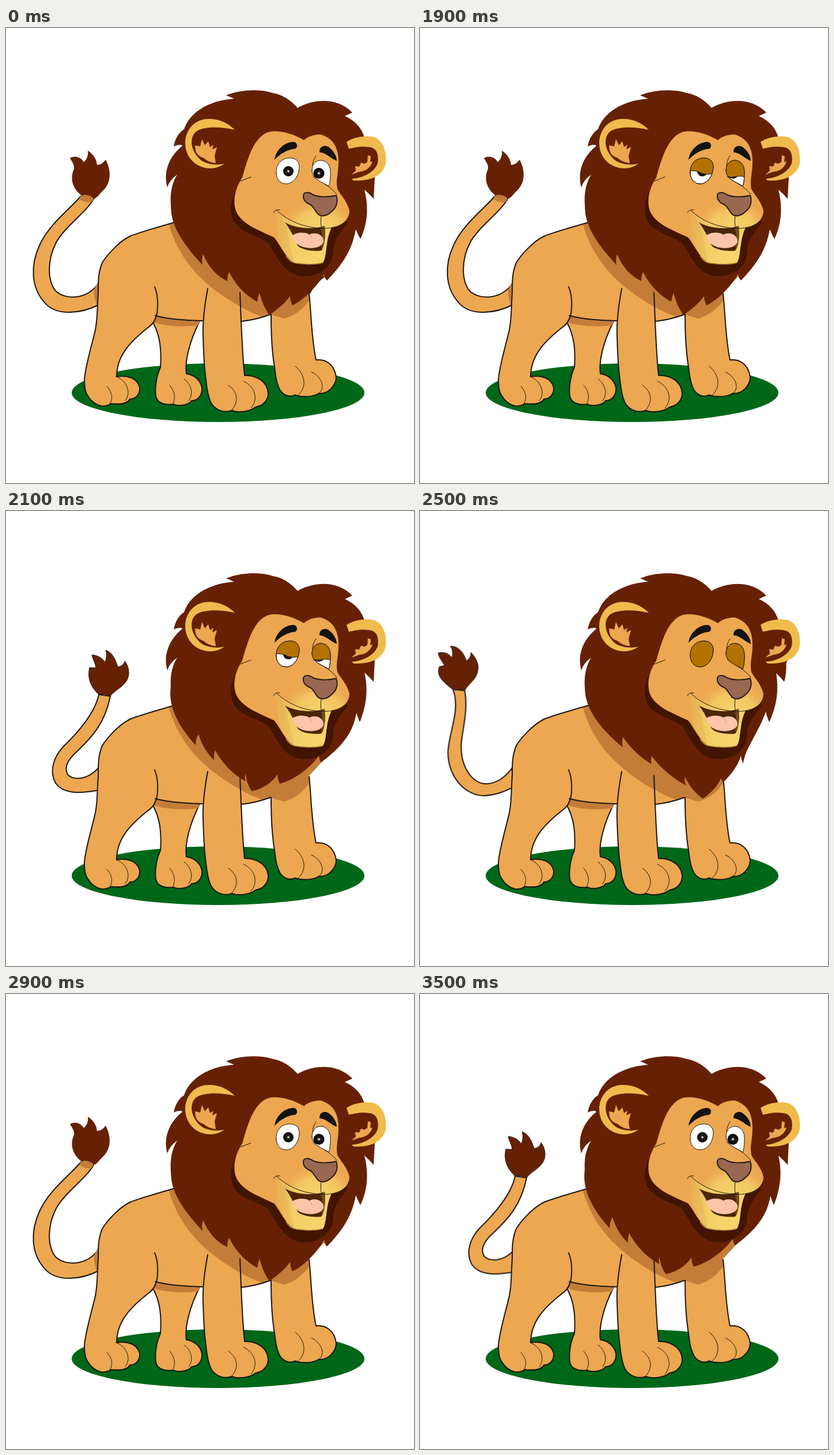
These frames come from a looping animation (708x791 px, 3.7 s). An HTML page:

```html
<!DOCTYPE html>
<html lang="en">
<head>
<meta charset="utf-8">
<title>Lion</title>
<style>
html, body { margin: 0; width: 100%; height: 100%; overflow: hidden; background: #fff; }
svg { display: block; width: 100%; height: 100%; }
.mane { fill: #662104; }
.dark { fill: #431400; }
.fur { fill: #eca750; }
.shade { fill: #c47d38; }
.gold { fill: #efbb4d; }
.ink { stroke: #1c1512; stroke-width: 2; stroke-linejoin: round; stroke-linecap: round; }
.thin { stroke: #1c1512; stroke-width: 1; stroke-linecap: round; }
.line { fill: none; }

.mid, .left, .right, .half, .shut, .neck, .tailL, .tailR { animation: 3700ms step-end infinite; }
.mid { animation-name: mid; }
.left { animation-name: left; }
.right { animation-name: right; }
.half { animation-name: half; }
.shut { animation-name: shut; }
.neck { animation-name: neck; }
.tailL { animation-name: tailL; }
.tailR { animation-name: tailR; }
@keyframes mid {
  0%, 51.3513%, 62.1621%, 78.3783% { visibility: visible; }
  45.9459%, 56.7567%, 67.5675%, 89.1891%, 100% { visibility: hidden; }
}
@keyframes left {
  0%, 51.3513%, 78.3783%, 100% { visibility: hidden; }
  45.9459%, 67.5675% { visibility: visible; }
}
@keyframes right {
  0%, 62.1621% { visibility: hidden; }
  56.7567%, 89.1891%, 100% { visibility: visible; }
}
@keyframes half {
  0%, 67.5675%, 94.5945%, 100% { visibility: hidden; }
  45.9459%, 89.1891% { visibility: visible; }
}
@keyframes shut {
  0%, 78.3783%, 100% { visibility: hidden; }
  67.5675% { visibility: visible; }
}
@keyframes neck {
  0% { visibility: visible; }
  45.9459%, 100% { visibility: hidden; }
}
@keyframes tailL {
  0% { transform: none; }
  67.5675%, 100% { transform: matrix(1, 0, 0, .9886, .5, 1.7); }
}
@keyframes tailR {
  0% { transform: none; }
  89.1891%, 100% { transform: translate(4px, -2.5px); }
}
</style>
</head>
<body>
<svg viewBox="0 0 708 791" preserveAspectRatio="none">
<defs>
  <radialGradient id="muzzle" gradientUnits="userSpaceOnUse" cx="542" cy="346" r="68" gradientTransform="translate(0 86.5) scale(1 .75)">
    <stop offset="0" stop-color="#f5d36b"/>
    <stop offset=".55" stop-color="#f2c662"/>
    <stop offset="1" stop-color="#eca750" stop-opacity="0"/>
  </radialGradient>
  <linearGradient id="chin" gradientUnits="userSpaceOnUse" x1="468" y1="360" x2="545" y2="380">
    <stop offset="0" stop-color="#ecb656"/>
    <stop offset=".4" stop-color="#f3cd66"/>
    <stop offset="1" stop-color="#f6d56c"/>
  </linearGradient>
  <radialGradient id="pupil">
    <stop offset="0" stop-color="#fff"/>
    <stop offset=".14" stop-color="#aaa"/>
    <stop offset=".32" stop-color="#1a1a1a"/>
    <stop offset="1" stop-color="#080808"/>
  </radialGradient>
  <path id="eyeL" d="M469,252C468,238 477,226 493,226C504,226 509,233 509,242C508,258 499,270 487,271C476,271 469,263 469,252Z"/>
  <path id="eyeR" d="M531,248C531,237 537,230 547,230C558,231 563,240 563,251C563,262 562,269 560,275C550,268 532,264 531,248Z"/>
  <path id="trunk" d="M292,338C265,346 235,354 215,362C195,372 175,395 167,408C160,425 160,440 160,460C159,490 159,505 155,525C200,545 230,535 250,518Q256,513 259,500C285,507 315,508 342,509L408,510C430,508 445,503 459,498L530,520C527,500 526,480 526,460L553,431L450,340Z"/>
  <path id="frontLegs" d="M350,453C345,480 341,510 342,535C343,570 344,588 346,603C348,622 350,640 356,652C363,664 378,670 392,665C405,670 425,666 433,659C448,657 455,645 455,635C454,615 435,603 414,604C410,570 408,510 406,460M460,498C460,530 461,560 466,590C468,607 470,620 476,630C483,640 493,642 502,638C515,643 535,641 543,635C560,637 573,620 573,607C570,585 555,575 538,577C530,540 530,500 526,462"/>
  <clipPath id="trunkClip"><use href="#trunk"/></clipPath>
  <clipPath id="clipL"><use href="#eyeL"/></clipPath>
  <clipPath id="clipR"><use href="#eyeR"/></clipPath>
</defs>

<ellipse cx="368" cy="634" rx="254" ry="51" fill="#006718"/>

<!-- tails -->
<g class="mid">
  <path class="fur ink" d="M165,479C130,498 85,502 65,475C44,450 42,413 58,378C75,340 113,313 131,291Q141,280 152,297C140,320 102,345 87,373C72,402 71,438 86,457C105,475 148,472 165,436Z"/>
  <path class="shade" d="M161,441Q151,452 153,463Q154,474 158,482L164,479V440ZM130,291Q141,280 152,297L148,303Q136,304 127,297Z"/>
  <path class="mane" d="M131,291C116,280 110,262 118,245C119,237 114,232 111,226C121,221 130,225 135,233C141,228 143,220 142,213C152,220 157,228 158,238C164,238 169,234 173,229C182,246 184,268 168,283C161,290 158,295 153,297C146,290 138,289 131,291Z"/>
</g>
<g class="left"><g class="tailL">
  <path class="fur ink" d="M57,312C70,350 49,388 48,423C49,470 80,498 110,499C132,498 147,491 166,482V441C150,465 135,477 115,478C90,478 70,448 71,410C72,385 84,350 77,314Z"/>
  <path class="mane thin" d="M57,313C46,303 35,296 32,285C31,279 32,275 33,272L42,270C38,262 32,256 31,248C41,245 49,249 55,256C57,248 56,241 52,236C66,235 76,248 80,262C85,259 88,253 88,247C97,257 102,268 100,278C98,295 85,300 77,314C70,311 64,312 57,313Z"/>
</g></g>
<g class="right"><g class="tailR">
  <path class="fur ink" d="M161,319C155,350 125,385 100,409C80,430 76,455 86,473C97,489 120,494 168,484V436C148,468 118,470 107,458C101,447 106,434 121,420C150,393 172,368 181,322Z"/>
  <path class="mane thin" d="M161,319C146,305 141,290 145,272L156,273C155,263 150,257 149,250C160,251 167,256 172,263C175,255 175,248 173,242C184,245 190,258 194,271C201,270 205,266 206,261C215,272 215,288 208,297C200,308 188,312 181,322C174,318 167,318 161,319Z"/>
</g></g>

<!-- body -->
<path class="fur ink" d="M254,510C268,535 270,560 268,590C261,605 258,625 260,640C262,652 275,656 290,654C300,659 318,655 322,648C335,648 341,636 340,625C337,610 325,603 313,601C310,580 318,545 336,510Z"/>
<path class="shade" d="M252,506L258,500L338,509L333,517Q290,522 257,512Z"/>
<path class="fur" d="M155,525C148,555 137,590 136,612C136,625 137,632 141,638C147,648 155,655 165,657C172,658 180,655 182,653C200,655 212,652 215,645C228,645 233,633 232,625C228,608 210,603 192,606C192,570 215,545 250,518L200,500Z"/>
<use href="#trunk" class="fur"/>
<use href="#frontLegs" class="fur"/>
<path class="shade" clip-path="url(#trunkClip)" d="M281,335C293,385 321,421 353,448C380,470 420,496 455,505C490,513 516,490 530,468L570,420L440,330Z"/>
<path class="ink line" d="M292,338C265,346 235,354 215,362C195,372 175,395 167,408C160,425 160,440 160,460C158,490 159,505 155,525C148,555 137,590 136,612C136,625 137,632 141,638C147,648 155,655 165,657C172,658 180,655 182,653C200,655 212,652 215,645C228,645 233,633 232,625C228,608 210,603 192,606C192,570 215,545 250,518C258,511 263,500 263,485C264,470 262,460 258,450M259,500C285,507 315,508 341,509M408,510C430,508 445,503 459,498"/>
<use href="#frontLegs" class="ink line"/>
<path class="thin line" d="M175,623C186,635 185,645 180,654M191,606C210,613 218,634 207,648M284,621C294,632 294,645 289,654M309,610C322,620 326,636 317,648M386,621C402,632 405,650 391,665M412,614C432,623 439,645 425,661M502,588C519,602 523,624 507,638M530,598C548,606 555,626 543,635"/>
<path class="neck ink line" d="M527,461C535,445 545,438 552,432"/>

<!-- mane -->
<path class="mane" d="M382,117C405,108 437,105 463,113C482,116 498,129 506,139C530,125 572,118 601,147L588,153C606,161 617,174 622,190L650,205L652,240L634,266L600,300L300,330L288,325C284,300 284,276 297,255Q284,264 280,277C272,250 284,222 306,205L304,203Q296,203 291,206C293,194 299,182 309,176C318,148 350,126 396,123Z"/>
<path class="mid mane" d="M287,305C283,335 300,368 341,412Q339,402 342,393C351,416 367,432 384,440Q384,431 387,424C400,450 418,466 436,476Q437,468 440,460C444,477 450,489 457,499C470,490 484,479 493,466Q493,474 497,482C515,474 537,453 552,428Q552,434 557,439C580,415 600,390 607,350Q610,358 615,367C630,335 628,305 622,281Q630,288 638,297L640,258L450,190Z"/>
<path class="left mane" d="M287,305C284,332 300,368 352,411Q350,402 352,393C366,413 384,430 402,440Q400,433 402,426C420,450 442,467 462,477Q458,470 460,462C466,477 478,491 491,500C505,490 516,479 522,465L526,472C540,458 552,443 557,425Q557,432 561,439C564,412 586,389 600,349Q602,358 606,367C619,340 623,310 618,282Q625,288 632,297Q637,280 635,258L450,190Z"/>
<path class="right mane" d="M287,300C279,335 297,372 329,407Q329,397 334,388C340,408 350,422 361,433Q360,424 363,416C378,443 397,460 416,470Q413,463 416,457C417,470 421,480 427,487C445,483 461,473 471,458Q471,466 475,474C500,468 530,445 543,425Q543,432 547,437C577,414 602,390 608,351Q610,358 614,367C627,335 628,305 622,281Q630,288 638,297L640,258L450,190Z"/>

<!-- ears -->
<path class="gold" d="M397,177C385,165 370,158 352,158C325,158 311,180 311,200C311,225 330,244 355,244C365,244 373,240 379,236C365,239 350,237 340,231C320,216 317,190 330,180C345,170 375,172 397,177Z"/>
<path class="fur" d="M329,213L328,204L337,206L340,193L345,204L351,197L354,207L360,203L358,211L366,207L362,222L364,235Q350,233 343,226Q331,222 329,213Z"/>
<path class="gold" d="M591,198C605,189 625,186 640,190C655,197 661,215 659,235C655,255 635,267 603,265L600,262C620,261 640,250 645,235C648,215 640,208 630,207C615,205 605,208 595,210Z"/>
<path class="fur" d="M599,255L607,248L606,240L613,241L616,234L622,236L627,233L628,221L633,223L632,233L636,232Q631,248 613,250Z"/>

<!-- face -->
<path class="dark" d="M398,285C388,300 386,330 402,345C420,360 444,364 456,375C470,398 482,426 510,431C540,435 568,418 568,386C568,372 580,354 594,338L500,300Z"/>
<path class="fur" d="M517,195C500,185 475,176 455,181C430,190 420,225 410,260C400,275 393,295 398,315C405,340 440,352 465,364C475,375 485,400 500,408C520,412 540,411 550,408C555,400 555,385 557,375C558,365 562,352 565,347C585,345 596,330 596,318C592,300 580,290 575,280C572,262 577,255 577,232C577,205 565,190 545,185C530,186 522,190 517,195Z"/>
<path fill="url(#muzzle)" d="M470,316C490,290 540,285 578,292Q594,302 596,318C596,332 585,345 565,347L547,349C515,347 488,335 470,316Z"/>
<path fill="url(#chin)" d="M470,317C487,334 515,347 547,348L565,347C562,352 558,365 557,375C555,385 555,400 550,408C540,411 520,412 500,408C486,398 476,380 472,362Q470,338 470,317Z"/>
<path fill="#e0a64e" opacity=".35" d="M470,317C487,336 490,365 500,408C484,397 476,380 472,362Z"/>
<path class="line" stroke="#b98a35" stroke-width="1.5" d="M486,396Q492,406 500,408C520,412 540,411 550,408"/>
<path fill="#4c2509" d="M484,338C505,350 535,350 553,344C555,360 553,380 547,387C530,389 511,385 506,378C500,365 495,352 484,338Z"/>
<path fill="#8d6935" d="M545,346L553,344C555,360 553,380 548,386L546,374Q552,362 545,346Z" opacity=".55"/>
<path fill="#fdc4aa" d="M496,361C505,354 520,355 526,359C540,353 552,361 551,372C545,386 518,385 506,376Q499,370 496,361Z"/>
<path class="line" stroke="#d99a84" d="M526,359Q530,362 531,367"/>
<path class="line thin" d="M464,321Q467,315 475,316M470,317C487,334 515,347 547,348C570,350 590,341 596,326M547,327Q545,340 548,348M407,266L425,259M538,222Q532,231 532,240M533,258C545,268 561,273 574,289"/>
<path fill="#986852" stroke="#2a1a18" stroke-width="2" d="M516,295C514,283 526,285 533,290C545,295 562,294 573,291C577,302 573,313 565,319C557,327 547,329 541,323C534,315 534,309 526,306C519,303 517,299 516,295Z"/>
<path fill="#131313" d="M466,229C468,212 484,198 498,198C506,198 507,207 502,210C489,211 478,217 466,229ZM544,216C544,205 553,203 560,207C568,213 574,222 574,231C565,228 556,217 544,216Z"/>

<!-- eyes -->
<g fill="#fff" class="thin"><use href="#eyeL"/><use href="#eyeR"/></g>
<circle cx="490" cy="249" r="9" fill="url(#pupil)"/>
<circle cx="543" cy="252.5" r="9.5" fill="url(#pupil)"/>
<g class="half thin" fill="#b37200">
  <path clip-path="url(#clipL)" d="M460,220H515V249Q506,257 490,253Q478,246 460,249Z"/>
  <path clip-path="url(#clipR)" d="M525,220H570V260Q556,256 545,259Q536,260 525,256Z"/>
  <g class="line"><use href="#eyeL"/><use href="#eyeR"/></g>
</g>
<g class="shut thin" fill="#b37200"><use href="#eyeL"/><use href="#eyeR"/></g>
</svg>
</body>
</html>
```
